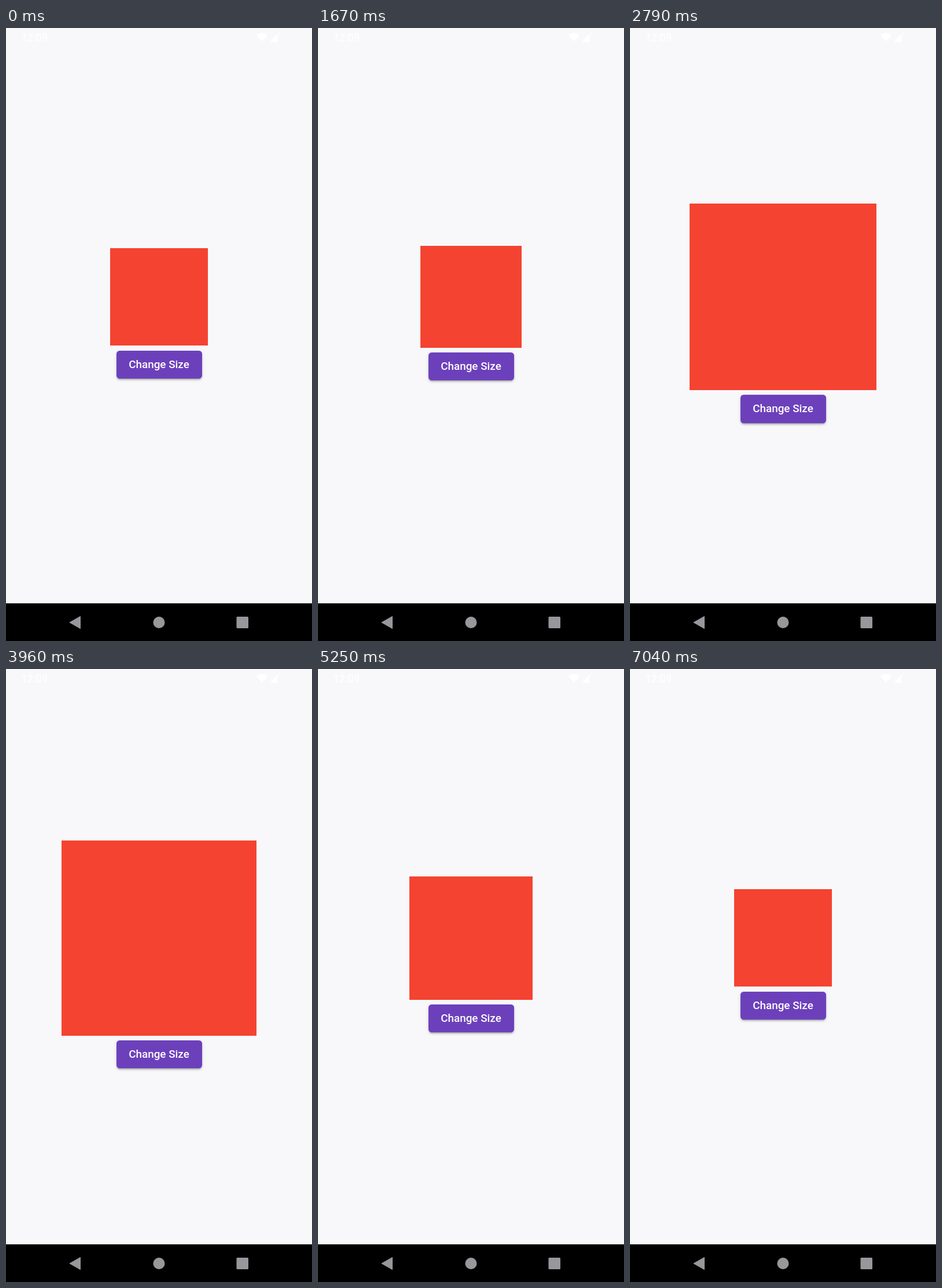
Animation, 529 px wide and 1058 px high, one loop 7.08 s. Source, as an HTML page:

```html
<!DOCTYPE html>
<html lang="en">
<head>
<meta charset="utf-8">
<title>Change Size</title>
<style>
  html, body { margin: 0; width: 100%; height: 100%; overflow: hidden; background: #f8f8fb; }
  svg, #box, #button { position: absolute; }
  svg { left: 0; top: 0; }
  #box { background: #f44331; }
  #button {
    left: 190.5px; width: 148px; height: 48.5px; border-radius: 5.4px;
    background: #6c40bb; color: #fff;
    font: 500 18.86px/48.5px Roboto, sans-serif; text-align: center; white-space: nowrap;
    box-shadow: 0 4px 1.4px -2.7px #0003, 0 2.7px 2.7px #00000024, 0 1.3px 6.7px #0000001f;
  }
</style>
</head>
<body>
<svg width="529" height="1058" viewBox="0 0 529 1058">
  <g fill="#fff">
    <text x="26" y="23" font-family="Roboto, sans-serif" font-size="18.5">12:09</text>
    <path d="M433 12Q442.500 5 452 12L442.500 23.500Z M456 24L472 8V12H469V24Z"/>
  </g>
  <path d="M0 993H529V1058H0Z"/>
  <g fill="#97979c">
    <path d="M110 1026L128.500 1015.500V1036.500Z" stroke="#97979c" stroke-linejoin="round"/>
    <circle cx="264.500" cy="1026" r="10"/>
    <rect x="398.500" y="1016" width="20.500" height="20" rx="1.500"/>
  </g>
</svg>
<div id="box"></div>
<div id="button">Change Size</div>
<script>
const LOOP = 7080, DURATION = 2120, GROW_AT = 1410, SHRINK_AT = 4255;
const SMALL = 168.5, LARGE = 337, CONTENT_HEIGHT = 993, BUTTON_SLOT = 64.7, GAP = 8.1;
const box = document.getElementById("box");
const button = document.getElementById("button");

// Cubic Bézier easing (0.4, 0, 0.2, 1), solved by bisection.
function ease(x) {
  if (x <= 0) return 0;
  if (x >= 1) return 1;
  let low = 0, high = 1;
  for (let i = 0; i < 24; i++) {
    const s = (low + high) / 2, r = 1 - s;
    if (1.2 * r * r * s + 0.6 * r * s * s + s ** 3 < x) low = s;
    else high = s;
  }
  return low * low * (3 - 2 * low);
}

function draw(now) {
  const t = now % LOOP;
  const growth = ease((t - GROW_AT) / DURATION) - ease((t - SHRINK_AT) / DURATION);
  const size = SMALL + (LARGE - SMALL) * growth;
  const top = (CONTENT_HEIGHT - BUTTON_SLOT - size) / 2;
  box.style.width = box.style.height = size + "px";
  box.style.left = (529 - size) / 2 + "px";
  box.style.top = top + "px";
  button.style.top = top + size + GAP + "px";
}

const start = performance.now();
function tick() {
  draw(performance.now() - start);
  requestAnimationFrame(tick);
}
tick();
</script>
</body>
</html>
```
